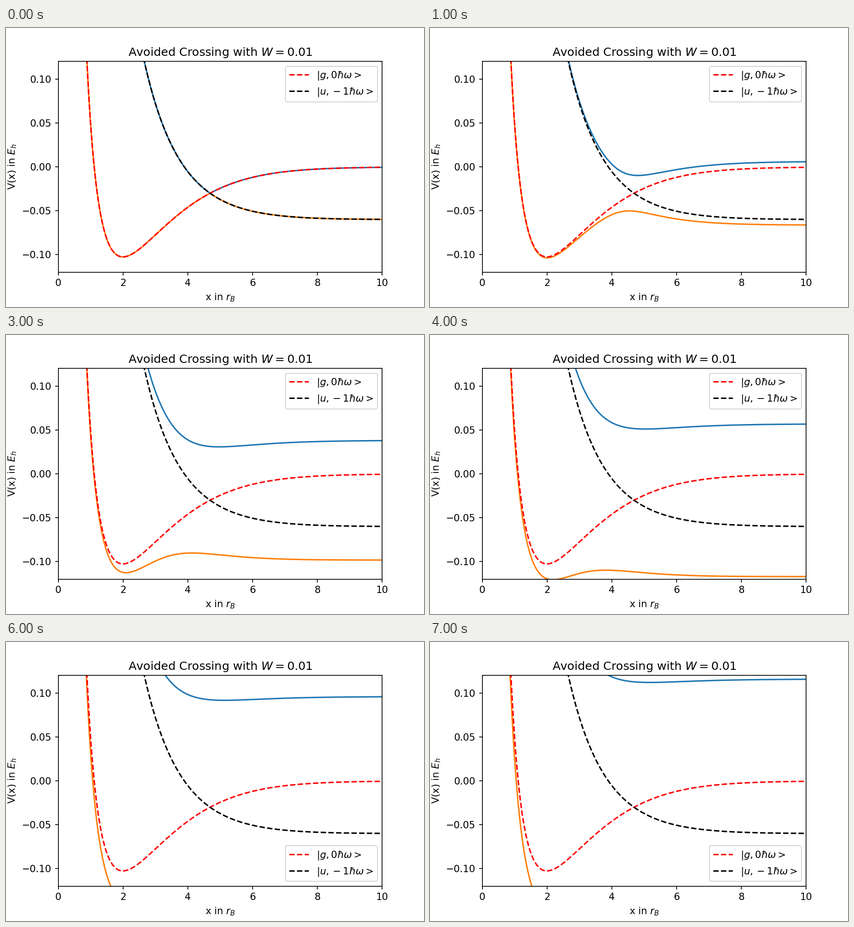
Write a matplotlib script that moves like this. It is 917 px wide and 611 px high and loops after 8000 ms.

```python
import numpy as np
import matplotlib.pyplot as plt
from matplotlib.animation import FuncAnimation
from numpy.polynomial import laguerre

FRAMES, INTERVAL = 8, 1000
PHOTON = 0.06          # photon energy in hartree
STEP = 1 / 49          # coupling added per frame

plt.rcParams.update({"font.size": 10, "font.family": "DejaVu Sans"})

# Laguerre basis and quadrature for the radial spheroidal equation
NODES, WEIGHTS = laguerre.laggauss(24)
BASIS = laguerre.lagvander(NODES, 11)
SLOPE = np.column_stack(
    [laguerre.Laguerre.basis(n).deriv()(NODES) for n in range(12)]) - BASIS / 2

# Legendre basis for the angular equation
ORDER = np.arange(30)
OFF = (ORDER[:-1] + 1) / np.sqrt((2 * ORDER[:-1] + 1) * (2 * ORDER[:-1] + 3))
ETA = np.diag(OFF, 1) + np.diag(OFF, -1)


def distance(p, parity):
    """Nuclear distance at which the one-electron molecule has parameter p."""
    angular = np.diag(-ORDER * (ORDER + 1.0)) + p**2 * ETA @ ETA
    lam = np.linalg.eigvalsh(angular[parity::2, parity::2])[-1]
    xi = 1 + NODES / (2 * p)
    kinetic = (SLOPE.T * (WEIGHTS * (4 * p * NODES + NODES**2))) @ SLOPE
    well = (BASIS.T * (WEIGHTS * (p**2 * xi**2 - lam))) @ BASIS
    overlap = 2 * (BASIS.T * (WEIGHTS * xi)) @ BASIS
    return np.linalg.eigvals(np.linalg.solve(overlap, kinetic + well)).real.min()


def potential(x, parity):
    """Energy above the dissociation limit; parity 0 is g, 1 is u."""
    p = np.linspace(0.2, 6.2, 400)
    r = np.array([distance(v, parity) for v in p])
    electronic = np.interp(x, r, -2 * (p / r)**2)
    return electronic + 1 / x + 0.5


x = np.linspace(0.5, 10, 500)
v_g = potential(x, 0)
v_u = potential(x, 1) - PHOTON
mean, half = (v_g + v_u) / 2, (v_g - v_u) / 2

fig = plt.figure(figsize=(6.00328, 4), dpi=152.75)
ax = fig.add_axes([0.125, 0.125, 0.775, 0.755])
upper, = ax.plot(x, mean, color="C0")
lower, = ax.plot(x, mean, color="C1")
ax.plot(x, v_g, "r--", label=r"$|g,0\hbar\omega>$")
ax.plot(x, v_u, "k--", label=r"$|u,-1\hbar\omega>$")
ax.set_xlim(0, 10)
ax.set_ylim(-0.12, 0.12)
ax.set_yticks([-0.10, -0.05, 0, 0.05, 0.10])
ax.set_xlabel("x in $r_B$")
ax.set_ylabel("V(x) in $E_h$")
ax.set_title("Avoided Crossing with $W=0.01$")
legend = ax.legend(loc="upper right")


def update(k):
    gap = np.hypot(half, STEP * k)
    upper.set_ydata(mean + gap)
    lower.set_ydata(mean - gap)
    # the legend makes room once the upper curve runs through it
    legend.set_loc("upper right" if k < 6 else "lower right")
    return upper, lower, legend


anim = FuncAnimation(fig, update, frames=FRAMES, interval=INTERVAL, repeat=True)
plt.show()
```
